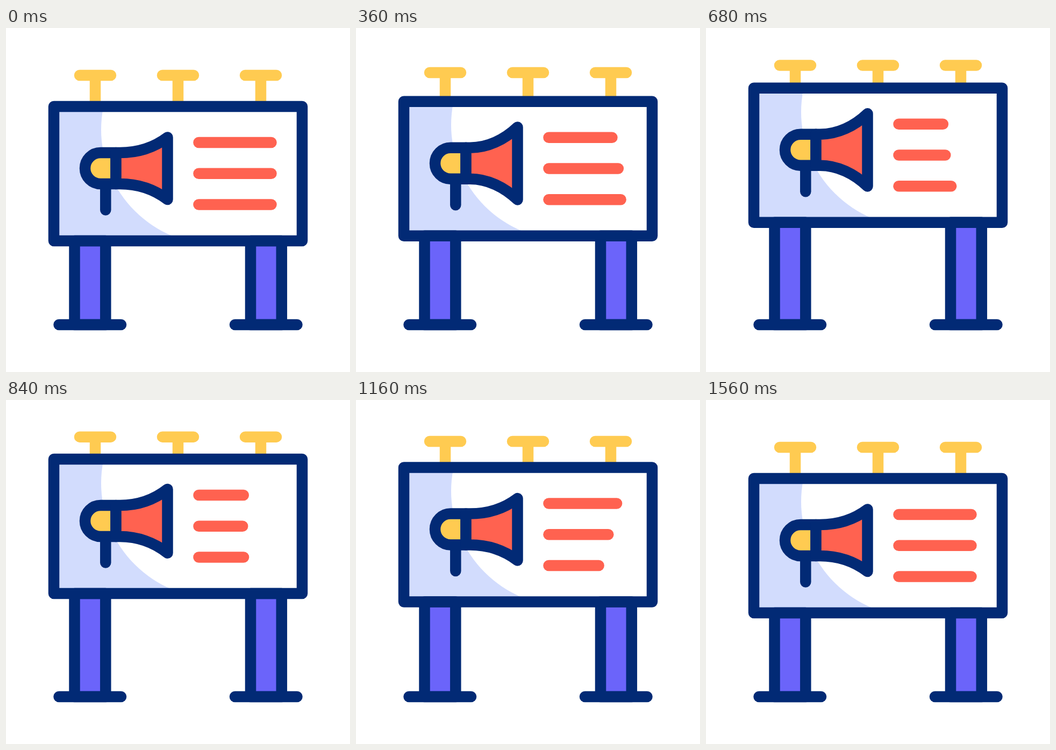
Recreate the animation shown at these times as an HTML page with a canvas. Size 640 by 640 pixels, loop 1640 ms.

```html
<!DOCTYPE html>
<html lang="en">
<head>
<meta charset="utf-8">
<title>Billboard</title>
<style>
  html, body { margin: 0; height: 100%; overflow: hidden; background: #fff; }
  canvas { display: block; width: 100vw; height: 100vh; }
</style>
</head>
<body>
<canvas id="stage" width="640" height="640"></canvas>
<script>
const ctx = document.getElementById('stage').getContext('2d');
const NAVY = '#022a75', YELLOW = '#ffcb51', RED = '#ff6250', PALE = '#d2dcfd', PURPLE = '#6b64fa';
const LOOP = 1640, STEP = 40;

// Symmetric cubic-bezier(.55, 0, .45, 1), solved by bisection.
function ease(p) {
  if (p <= 0 || p >= 1) return p <= 0 ? 0 : 1;
  let lo = 0, hi = 1, u;
  for (let i = 0; i < 24; i++) {
    u = (lo + hi) / 2;
    const v = 1 - u;
    const x = 1.65 * v * v * u + 1.35 * v * u * u + u * u * u;
    if (x < p) lo = u; else hi = u;
  }
  return u * u * (3 - 2 * u);
}

// Eases 0 to 1 and back to 0.
const swing = (t, start, peak, end) =>
  t < peak ? ease((t - start) / (peak - start)) : 1 - ease((t - peak) / (end - peak));

function shape(d, stroke, fill) {
  const path = new Path2D(d);
  if (fill) { ctx.fillStyle = fill; ctx.fill(path); }
  if (stroke) { ctx.strokeStyle = stroke; ctx.stroke(path); }
}

function drawLamps(lift, boardLift) {
  for (const x of [166, 320, 474]) {
    shape(`M${x - 29} ${88 - lift}h58M${x} ${88 - lift}V${146 - boardLift}`, YELLOW);
  }
}

function drawShade(lift) {
  ctx.save();
  ctx.beginPath();
  ctx.rect(89, 146 - lift, 462, 250);
  ctx.clip();
  ctx.fillStyle = PALE;
  ctx.fillRect(89, 146 - lift, 300, 250);
  ctx.fillStyle = '#fff';
  ctx.beginPath();
  ctx.arc(391, 189 - lift * 0.953, 214, 0, 7);
  ctx.fill();
  ctx.restore();
}

function drawMegaphone(flare) {
  const top = 203.5 - flare, bottom = 319 + flare;
  shape('M185.3 290V338.5', NAVY);
  shape('M204.5 232H176a29 29 0 0 0 0 58H204.5z', NAVY, YELLOW);
  shape(`M204.5 232H212C245 232 276 ${222 - flare * 0.5} 300.5 ${top}V${bottom}` +
    `C276 ${300.5 + flare * 0.5} 245 290 212 290H204.5z`, NAVY, RED);
}

function drawLegs(lift) {
  for (const x of [127.5, 455]) {
    shape(`M${x} ${396 - lift}h57.8V552h-57.8z`, NAVY, PURPLE);
    shape(`M${x - 29} 552h115.5`, NAVY);
  }
}

function draw(t) {
  const rise = swing(t, 80, 815, 1550);
  const lift = 36 * rise;
  ctx.fillStyle = '#fff';
  ctx.fillRect(0, 0, 640, 640);
  ctx.lineWidth = 20.5;
  ctx.lineCap = ctx.lineJoin = 'round';

  drawLamps(19.4 * rise, lift);
  drawShade(lift);
  drawLegs(lift);
  shape(`M89 ${146 - lift}h462v250h-462z`, NAVY);

  ctx.save();
  ctx.translate(0, -lift);
  drawMegaphone(12.6 * swing(t, 80, 520, 970));
  [213, 270.8, 328.5].forEach((y, i) => {
    const s = i * 100;
    const shrink = 53.3 * swing(t, 85 + s, 748 + s, 1347 + s);
    shape(`M358.5 ${y}H${493.5 - shrink}`, RED);
  });
  ctx.restore();
}

const begin = performance.now();
function tick() {
  const t = (performance.now() - begin) % LOOP;
  draw(Math.floor(t / STEP) * STEP);
  requestAnimationFrame(tick);
}
tick();
</script>
</body>
</html>
```
